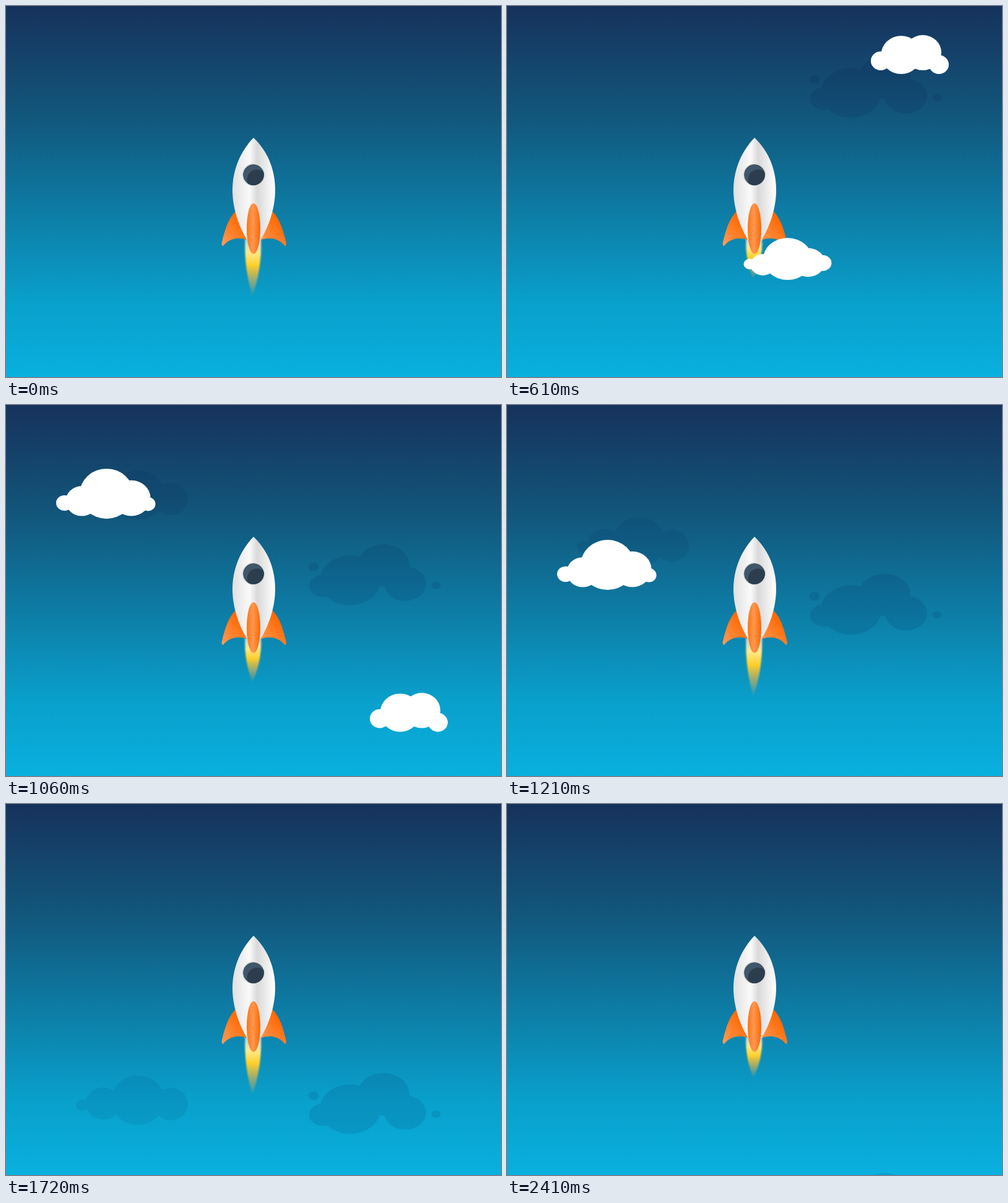
An HTML page that plays this animation: 800 px wide and 600 px high, repeating every 2440 ms.

```html
<!DOCTYPE html>
<html lang="en">
<head>
<meta charset="utf-8">
<title>Rocket flight</title>
<style>
  html, body { margin: 0; width: 100%; height: 100%; overflow: hidden; }
  svg { display: block; width: 100%; height: 100%; }
</style>
</head>
<body>
<svg viewBox="0 0 800 600">
  <defs>
    <linearGradient id="sky" x2="0" y2="1">
      <stop stop-color="#16325c"/><stop offset=".3" stop-color="#12577c"/>
      <stop offset=".8" stop-color="#09a0cc"/><stop offset="1" stop-color="#09b0de"/>
    </linearGradient>
    <linearGradient id="hull">
      <stop stop-color="#e0e0e0"/><stop offset=".4" stop-color="#fafafa"/>
      <stop offset=".58" stop-color="#d9d9d9"/><stop offset="1" stop-color="#fff"/>
    </linearGradient>
    <linearGradient id="wing" x1=".7" y1=".3" x2=".1" y2="1">
      <stop stop-color="#ff6a05"/><stop offset="1" stop-color="#ff9a55"/>
    </linearGradient>
    <linearGradient id="mirrored" href="#wing" x1=".3" x2=".9"/>
    <linearGradient id="keel">
      <stop stop-color="#ff7414"/><stop offset=".45" stop-color="#ff9850"/><stop offset="1" stop-color="#ff6600"/>
    </linearGradient>
    <linearGradient id="fire" x2="0" y2="1">
      <stop stop-color="#fff" stop-opacity=".65"/><stop offset=".24" stop-color="#ffe98a"/>
      <stop offset=".46" stop-color="#ffcf2a"/><stop offset="1" stop-color="#ffa64a" stop-opacity=".1"/>
    </linearGradient>
    <filter id="soft"><feGaussianBlur stdDeviation="1"/></filter>
    <clipPath id="glass"><circle cx="400" cy="273" r="17"/></clipPath>
    <path id="fin" d="M371 332C358 345 353 365 348.5 384Q348.5 388 351 388C361 375 377 373 391 379L382 350Z"/>
  </defs>
  <rect width="800" height="600" fill="url(#sky)"/>
  <g id="back" fill="#00083c"></g>
  <!-- the flame hangs from its own origin so that it can be stretched downwards -->
  <path id="flame" fill="url(#fire)" filter="url(#soft)" d="M-13 0H13C14 34 8 66 -1 90C-9 66 -14 34 -13 0Z"/>
  <use href="#fin" fill="url(#wing)"/>
  <use href="#fin" fill="url(#mirrored)" transform="translate(801.5) scale(-1 1)"/>
  <path fill="url(#hull)" d="M400 213C378 236 366 266 366 298C366 328 377 358 390 379H411C424 358 435 328 435 298C435 266 424 236 400 213Z"/>
  <circle cx="400" cy="273" r="18.5" fill="#deded8"/>
  <g clip-path="url(#glass)">
    <circle cx="400" cy="273" r="17" fill="#40566a"/>
    <circle cx="406" cy="281" r="16.5" fill="#2c3e4e"/>
  </g>
  <ellipse cx="400" cy="360" rx="11" ry="41" fill="url(#keel)"/>
  <g id="front" fill="#fff"></g>
</svg>
<script>
  const LOOP = 2440, FLICKER = 600 / 7;
  const byId = id => document.getElementById(id);

  // A cloud is a row of puffs [x, radius, lift], equally squashed, that rest on
  // a bowl with its lowest point at (x, floor); `sag` is how much the bowl curves.
  function addCloud(layer, opacity, { x, floor, sag, squash, at, speed }, puffs) {
    const node = document.createElementNS('http://www.w3.org/2000/svg', 'g');
    node.setAttribute('opacity', opacity);
    node.innerHTML = puffs.map(([dx, r, lift = 0]) => {
      const cy = floor - sag * dx * dx - lift - r * squash;
      return `<ellipse cx="${x + dx}" cy="${cy}" rx="${r}" ry="${r * squash}"/>`;
    }).join('');
    byId(layer).append(node);
    return t => node.setAttribute('transform', `translate(0 ${(t - at) * speed})`);
  }

  const moveClouds = [
    addCloud('back', .095, { x: 556, floor: 467, sag: 0, squash: .82, at: 1510, speed: .318 },
      [[-59, 8.5, 55], [-44, 22, 13], [0, 49], [54, 42, 30], [89, 34, 7], [139, 7.5, 26]]),
    addCloud('back', .065, { x: 213, floor: 413, sag: .0028, squash: .93, at: 1510, speed: .505 },
      [[-90, 10], [-56, 28], [0, 43], [53, 28]]),
    addCloud('front', 1, { x: 637, floor: 110, sag: 0, squash: .95, at: 610, speed: .93 },
      [[-33, 16, 6], [0, 32.5], [35, 30, 6], [61, 16]]),
    addCloud('front', 1, { x: 453.5, floor: 443, sag: .0046, squash: .86, at: 610, speed: .93 },
      [[-61, 10], [-40, 20], [0, 39.5], [33, 27], [56, 15]]),
    addCloud('front', 1, { x: 162.5, floor: 299, sag: .0028, squash: .93, at: 1210, speed: .767 },
      [[-68, 13.5], [-40, 26], [0, 43.5], [40, 31], [67, 12]])
  ];

  function draw() {
    const now = performance.now() % LOOP;
    const t = now < 70 ? 0 : now - (now + 20) % 30; // held in 30 ms steps

    // the clouds come to rest shortly before the loop ends
    for (const move of moveClouds) move(Math.min(t, 2230));

    // the flame grows and snaps back, with a slight wobble in its rhythm
    const beat = t / FLICKER + .893 + .03 * Math.cos(2 * Math.PI * t / LOOP);
    const length = 64 + 30 * (beat % 1);
    byId('flame').setAttribute('transform', `translate(399.3 377) scale(1 ${length / 90})`);

    requestAnimationFrame(draw);
  }
  draw();
</script>
</body>
</html>
```
